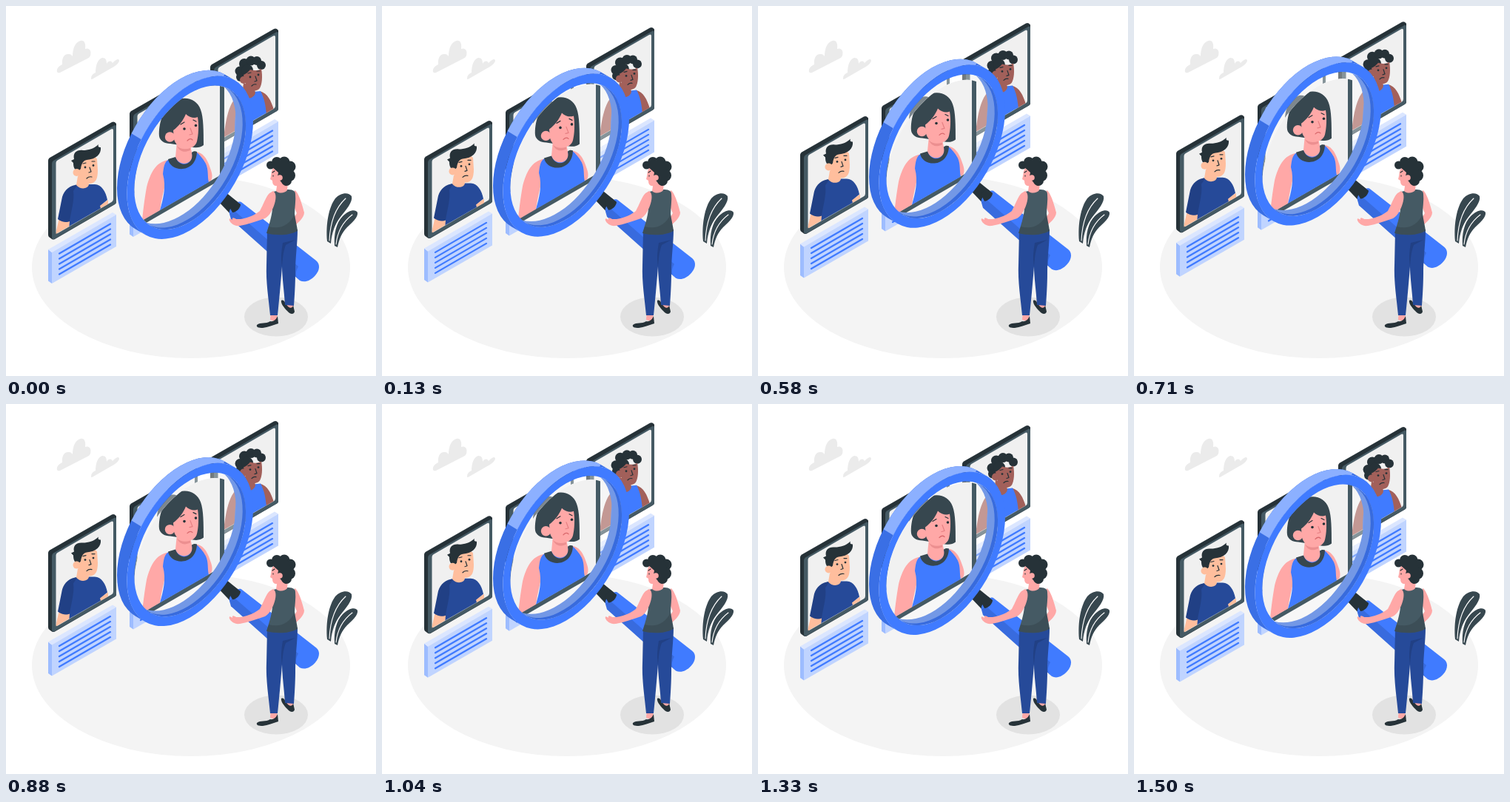
Write an HTML page that moves like this. It is 500 by 500 pixels and loops after 1540 ms.

```html
<!DOCTYPE html>
<html lang="en">
<head>
<meta charset="utf-8">
<title>Choosing a candidate</title>
<style>
  html, body { margin: 0; width: 100%; height: 100%; overflow: hidden; background: #fff; }
  svg { display: block; width: 100vw; height: 100vh; }
  .ink { fill: #263238; }
  .slate { fill: #37474f; }
  .steel { fill: #455a64; }
  .blue { fill: #407bff; }
  .navy { fill: #264a99; }
  .pink { fill: #ffa8a7; }
  .peach { fill: #ffbe9d; }
  .brown { fill: #a2605a; }
  .line { fill: none; stroke: #263238; stroke-width: 1.2; stroke-linecap: round; stroke-linejoin: round; }
  .vein { fill: none; stroke: #fff; stroke-width: 1.1; stroke-linecap: round; }
  .shade { fill: #000; opacity: .13; }
</style>
</head>
<body>
<svg viewBox="0 0 500 500">
  <defs>
    <g id="panel">
      <path class="ink" d="M57 209Q57 206 60 204.500L143 157Q145 156 147 157L149 159V265Q149 267 147 268L66 315Q64 316 62 315L58 312Q57 311 57 309Z"/>
      <path class="steel" d="M62 213Q62 210.500 64 209L146 161.500Q149 160 149 163V264Q149 266.500 147 268L66 314.500Q62 316.500 62 312Z"/>
      <path fill="#f0f0f0" d="M67.500 212Q67.500 209.500 69.500 208.400L142 166.500Q145 165 145 168V261Q145 263.500 143 264.700L70 307Q67.500 308 67.500 305Z"/>
      <path fill="#9dbcff" d="M57 329L62 333V375L57 371.500Z"/>
      <path fill="#dbe6ff" d="M57 329L144 279L149 282L62 333Z"/>
      <path fill="#c0d4ff" d="M62 333L149 282V325L62 375Z"/>
      <path id="text" fill="none" stroke="#407bff" stroke-width="2.300" stroke-linecap="round"/>
    </g>
    <clipPath id="photo"><path d="M67.500 209.500L145 165V263.500L67.500 308Z"/></clipPath>
    <clipPath id="photo3"><path d="M286.500 83.500L364 39V137.500L286.500 182Z"/></clipPath>
    <clipPath id="view"><ellipse class="hole" transform="translate(248.700 204.700) rotate(-60)"/></clipPath>
    <clipPath id="upper"><path d="M-11 -90L-13 0H140V-90Z"/></clipPath>
  </defs>

  <ellipse cx="250" cy="353" rx="215" ry="123" fill="#f4f4f4"/>
  <g fill="#ebebeb">
    <path d="M69 89C68 84 72 81 76 79C75 70 79 64 85 65C88 65 89 67 90 68C90 57 94 48 101 47C106 46 108 51 107 58C112 56 116 60 114 67C113 70 110 71 108 72L73 90Q70 91 69 89Z"/>
    <path d="M115 98C115 94 117 92 121 90C121 80 124 72 130 70C135 70 136 73 136 78C138 74 142 73 144 77C148 73 152 70 153 74C152 78 148 81 144 83L118 98Q115 100 115 98Z"/>
  </g>
  <ellipse cx="365" cy="420" rx="43" ry="26.500" fill="#e2e2e2"/>

  <g id="plant">
    <path class="slate" d="M434 318C432 295 436 272 445 260C452 252 463 251 467 257C469 265 459 276 452 285C445 294 440 306 439 321Z"/>
    <path class="slate" d="M444 324C443 308 446 293 455 284C463 276 472 274 475 279C476 286 468 292 461 299C454 306 450 315 448 326Z"/>
    <path class="vein" d="M437 317C438 292 446 272 459 260M446 322C448 304 456 291 468 282"/>
  </g>

  <g class="slow">
    <use href="#panel" x="219" y="-126"/>
    <g clip-path="url(#photo3)">
      <path class="brown" d="M322 117C306 121 298 140 294 180L310 172L320 126ZM343 115C354 118 358 128 362 140L350 148Z"/>
      <path class="blue" d="M318 121C311 132 309 146 309 174L352 148C351 135 349 124 344 115L334 116Z"/>
      <path class="shade" d="M318 121C311 132 309 146 309 174L330 161C324 147 323 134 326 122Z"/>
      <path class="brown" d="M321 104L319 120C324 128 336 125 337 117L335 110Z"/>
    </g>
    <g class="ink">
      <circle cx="316" cy="88" r="6.500"/><circle cx="322" cy="78" r="7"/><circle cx="331" cy="74" r="6.500"/>
      <circle cx="339" cy="74" r="6"/><circle cx="345" cy="80" r="6"/><circle cx="317" cy="96" r="6"/><circle cx="326" cy="87" r="8"/>
    </g>
    <path class="brown" d="M321 93C326 91 328 88 330 86C336 88 342 87 345 85C347 95 346 106 343 111C339 116 330 116 325 111Z"/>
    <circle class="brown" cx="321" cy="100" r="5"/>
    <path class="line" d="M327 91L331 90M339 88L343 88M337 95L339 101L336 102" stroke-width="1"/>
    <path class="line" d="M332 108Q335 105 338 106" stroke-width="1"/>
    <circle class="ink" cx="330" cy="96" r="1.400"/><circle class="ink" cx="341" cy="93" r="1.400"/>

    <use href="#panel" x="110" y="-63"/>
    <path class="slate" d="M204 166C203 147 212 133 224 130C236 129 240 139 240 166Z"/>

    <use href="#panel"/>
    <g clip-path="url(#photo)">
      <path class="peach" d="M72 286L66 312L84 302L88 288ZM126 270L138 262V272L128 278Z"/>
      <path class="navy" d="M97 241C86 243 79 248 76 258L70 288C75 292 82 293 86 291L85 302L129 277L127 270L137 262C135 251 129 241 120 241Z"/>
      <path class="shade" d="M97 241C86 243 79 248 76 258L70 288C75 292 82 293 86 291C88 277 93 262 91 250Z"/>
      <path class="peach" d="M97 230L95 242C101 249 111 247 112 241L110 233Z"/>
    </g>
    <path class="peach" d="M98 210C99 204 120 200 123 207L124 222C124 234 121 239 114 240C105 240 99 236 97 228Z"/>
    <path class="ink" d="M88 209L92 207C90 198 96 194 104 195C111 195 119 193 125 187C124 190 125 191 128 191C129 200 122 207 109 208C104 209 102 213 101 220L97 224C92 221 91 217 91 212Z"/>
    <circle class="peach" cx="95.500" cy="225" r="5"/>
    <path class="line" d="M104 213L108 212M116 210L120 210M113 218L115 224L112 225" stroke-width="1"/>
    <path class="line" d="M109 233Q112 230 116 231" stroke-width="1"/>
    <circle class="ink" cx="107" cy="218" r="1.400"/><circle class="ink" cx="118" cy="215.500" r="1.400"/>
  </g>

  <g class="fast">
    <ellipse class="hole" transform="translate(248.700 204.700) rotate(-60)" fill="#fff" opacity=".35"/>
  </g>

  <g class="slow">
    <g clip-path="url(#view)">
      <path fill="#f7f7f7" d="M160 80H295V330H160Z"/>
      <path fill="#f1f1f1" d="M160 80H289V229L160 303.500Z"/>
      <path class="steel" d="M289 80H295V232L160 310V303.500L289 229Z"/>
      <path class="pink" d="M219 208C202 211 195 226 190 245C187 262 185 278 184 290L208 276C210 262 213 250 216 238ZM256 197C268 198 273 209 277 222C279 228 279 232 277 236L265 240Z"/>
      <path class="blue" d="M219 208C214 211 213 218 212 227C217 245 212 262 208 276L274 238C272 230 274 222 270 213C266 206 262 201 257 197Z"/>
      <path class="slate" d="M207 176C206 160 212 138 226 130C240 120 258 125 263 140C267 150 267 170 267 188C262 192 256 192 248 190L222 186C214 186 208 182 207 176Z"/>
      <path class="pink" d="M231 183L229 204C232 215 249 217 252 203L249 188Z"/>
      <path fill="#ec8f90" d="M231 189C236 194 243 194 249 192L249 195C240 199 234 196 231 189Z"/>
      <path class="slate" d="M219 207C222 225 257 227 258 197C256 196 253 196 251 198C255 214 235 221 229 204Z"/>
      <path class="pink" d="M226 168C233 163 240 154 243 146C248 151 255 152 259 150C261 162 260 175 258 183C256 190 250 193 242 192C234 192 229 187 227 180Z"/>
      <circle class="pink" cx="221.500" cy="177" r="6.700"/>
      <path class="line" d="M236 160L241 157M253 154L257 156"/>
      <path class="line" d="M249 165L252 173L248 174" style="stroke:#e57f82"/>
      <path class="line" d="M245 182Q249 178 252 181" style="stroke:#d9686c"/>
      <circle class="ink" cx="241" cy="166" r="1.800"/><circle class="ink" cx="256.500" cy="161.500" r="1.800"/>
    </g>
  </g>

  <g class="fast">
    <path class="ink" d="M285 262L296 251L317 268L305 283Z"/>
    <path class="blue" d="M302 281C300 274 311 262 318 265L419 344C425 349 424 357 418 364C411 372 403 374 397 371L304 288Z"/>
    <path class="shade" d="M302 280L304 288L397 371C390 365 391 360 395 352L309 277Z"/>
    <path class="ink" d="M301 270L309 262L317 268C317 273 311 279 306 279Z"/>
    <g id="ring" transform="translate(235.300 197)rotate(-60)"></g>
  </g>

  <g id="person">
    <path class="pink" d="M390 249C395 251 400 267 403 279C403 286 394 294 386 300L381 295C387 289 391 284 393 280L387 266Z"/>
    <path class="pink" d="M358 410L357 424L366 427L367 410ZM377 396L376 404C380 408 386 412 388 408L389 398Z"/>
    <path class="ink" d="M339 431C344 427 351 430 357 426C361 427 365 424 367 419L368 429C361 431 354 434 347 435C341 435 338 434 339 431ZM372 398C376 396 377 402 381 406C384 409 388 408 388 404L390 413C389 417 384 417 380 412C376 408 371 402 372 398Z"/>
    <path class="navy" d="M353 304L394 302C394 320 391 340 391 360C391 375 390 392 389 405L377 404C376 385 373 367 373 352C371 377 369 398 367 418H357C355 396 351 373 352 350Z"/>
    <path class="shade" d="M374 320C371 337 372 345 373 352C374 343 374 334 378 323L391 316Z"/>
    <path class="steel" d="M361 251C367 250 373 248 380 248C386 248 391 249 391 254C392 263 390 272 390 281C391 289 393 296 394 304C381 311 364 310 352 307C355 297 359 286 360 274Z"/>
    <path class="shade" d="M390 281C391 289 393 296 394 304C381 311 364 310 352 307L355 298C370 302 383 297 390 281Z"/>
    <path class="pink" d="M361 250C366 253 365 262 362 270C359 278 355 284 350 287C338 291 327 295 316 297C309 298 304 294 302 290C301 286 303 287 306 289C305 285 308 286 311 288L317 288C328 286 337 282 343 277C348 268 351 258 356 253Z"/>
    <path class="pink" d="M367 237L365 250C369 254 377 253 380 249L381 238Z"/>
    <path class="pink" d="M361 219C358 223 359 228 357 234L360 236C360 241 362 244 368 243L380 236L377 219Z"/>
    <g class="ink">
      <circle cx="357.500" cy="215" r="5.500"/><circle cx="366" cy="211" r="7"/><circle cx="376" cy="211" r="7.500"/>
      <circle cx="384" cy="217" r="7.500"/><circle cx="383" cy="229" r="8"/><circle cx="379" cy="236" r="7"/>
      <path d="M359 217L368 225L367 230L371 237L378 243L389 232L380 210L364 210Z"/>
    </g>
    <circle class="pink" cx="370" cy="232" r="3.800"/>
    <path class="line" d="M360 225L363 223M361 229V230" stroke-width="1"/>
  </g>
</svg>
<script>
const LOOP = 1540, STEP = 1000 / 24, STEPS = 37, LIFT = 10;
const $$ = sel => document.querySelectorAll(sel);

// Radii and depth of the ring; isometric circles are ellipses with these axis ratios.
const R = 98.5, r = 87, depth = 15.5;
const major = q => q * Math.sqrt(1.5), minor = q => q * Math.sqrt(.5);

const oval = (q, y) => {
  const a = major(q), b = minor(q);
  return `M${-a} ${y}A${a} ${b} 0 0 1 ${a} ${y}A${a} ${b} 0 0 1 ${-a} ${y}Z`;
};

// Part of the inner wall seen between the front opening and one k further back.
const crescent = k => {
  const a = major(r), b = minor(r), y = depth - k / 2;
  const x = a * Math.sqrt(1 - (k / 2 / b) ** 2);
  return `M${-x} ${y}A${a} ${b} 0 1 0 ${x} ${y}A${a} ${b} 0 0 1 ${-x} ${y}Z`;
};

const [A, B] = [major(R), minor(R)];
const side = `M${-A} 0A${A} ${B} 0 0 1 ${A} 0V${depth}A${A} ${B} 0 0 0 ${-A} ${depth}Z`;
const part = (d, fill, more = '') => `<path d="${d}" fill="${fill}" ${more}/>`;

document.getElementById('ring').innerHTML =
  part(side, '#3a6fe5') +
  part(side, '#8cb0ff', 'clip-path="url(#upper)"') +
  part(oval(R, depth) + oval(r, depth), '#407bff', 'fill-rule="evenodd"') +
  part(crescent(depth), '#7398e6') +
  part(crescent(5), '#386bdd');

$$('.hole').forEach(e => {
  e.setAttribute('rx', major(r));
  e.setAttribute('ry', minor(r));
});

document.getElementById('text').setAttribute('d',
  [0, 1, 2, 3, 4].map(i => `M72 ${334.5 + 7 * i}l69 -40`).join(''));

// Linear rise and fall, at 24 pictures a second.
const lift = k => {
  const p = (k + 1.15) / STEPS % 1;
  return LIFT * (1 - Math.abs(1 - 2 * p));
};
const slow = $$('.slow'), fast = $$('.fast');
const move = (list, y) => list.forEach(e => e.setAttribute('transform', `translate(0 ${y})`));

function draw(now) {
  const k = Math.min(STEPS - 1, Math.floor((now % LOOP + 5) / STEP));
  const y = lift(0) - lift(k);
  move(slow, y);
  move(fast, 2 * y);
}

let start;
function tick(now) {
  start ??= now;
  draw(now - start);
  requestAnimationFrame(tick);
}
draw(0);
requestAnimationFrame(tick);
</script>
</body>
</html>
```
